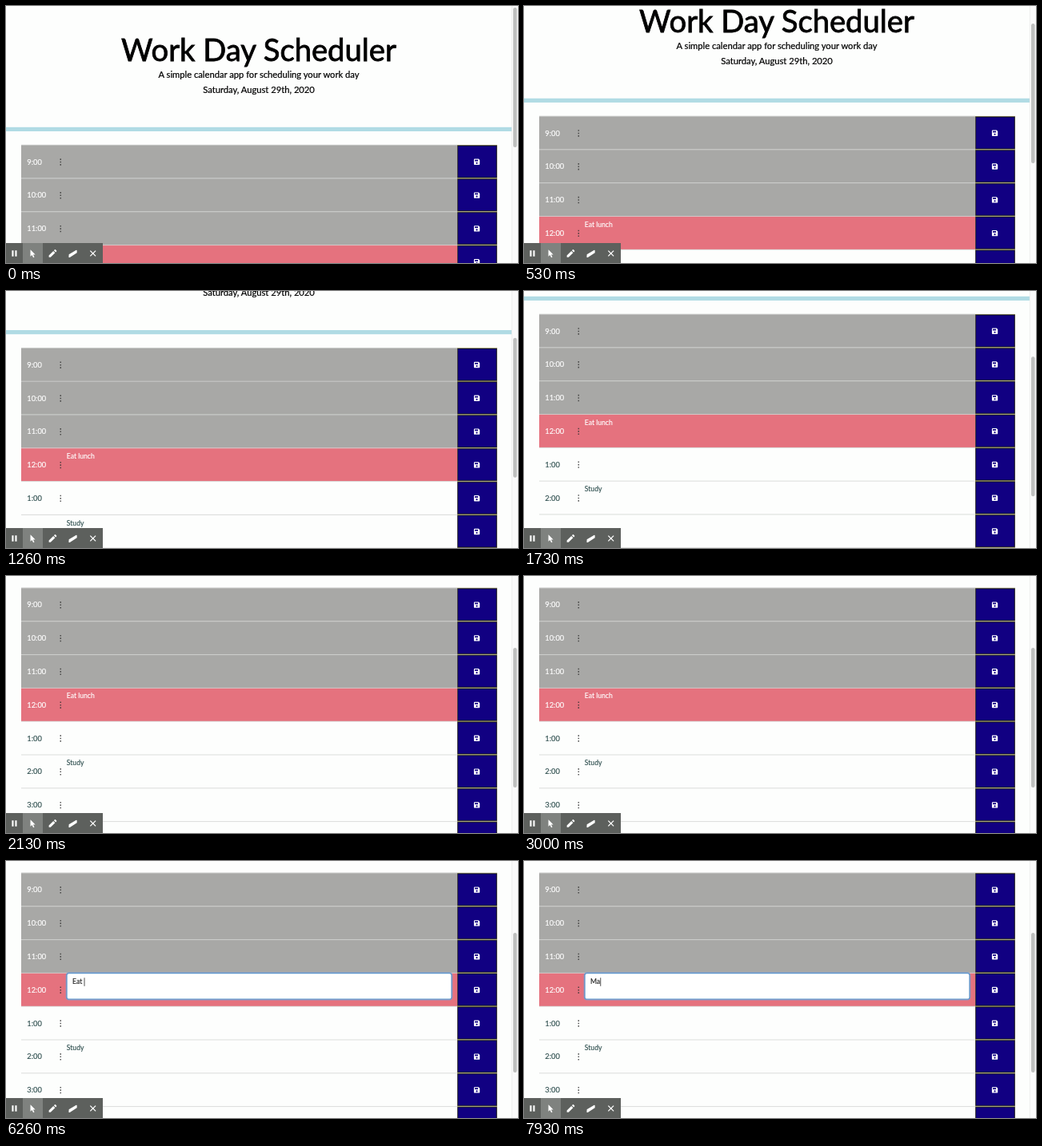
Write an HTML page that moves like this. It is 640 by 322 pixels and loops after 8 s.

```html
<!DOCTYPE html>
<html lang="en">
<head>
<meta charset="utf-8">
<title>Work Day Scheduler</title>
<style>
  html, body { margin: 0; height: 100%; overflow: hidden; background: #fdfefd; }
  svg { display: block; width: 100vw; height: 100vh; }
  text {
    font: 8.6px Lato, "Open Sans", sans-serif;
    fill: currentColor; stroke: currentColor; stroke-width: .15px;
    white-space: pre;
  }
  .heading text { text-anchor: middle; font-size: 11.2px; stroke-width: .22px; }
  .heading .title { font-size: 38.2px; stroke-width: .8px; }
  .time { font-size: 9.3px; }
  .past { --fill: #a8a8a6; color: #fff; }
  .present { --fill: #e5727e; color: #fff; }
  .future { --fill: #fdfefd; color: #2f4f4f; }
</style>
</head>
<body>
<svg viewBox="0 0 640 322">
  <defs>
    <g id="save">
      <rect width="50" height="41.8" fill="#8c8a50"/>
      <rect x=".4" y=".8" width="49.2" height="40.3" fill="#0c0838"/>
      <rect x="1.2" y="1.7" width="47.4" height="38.5" fill="#110082"/>
      <path d="M21.8 17.6h4.9l1.5 1.5v5a.9.9 0 0 1-.9.9h-5.5a.9.9 0 0 1-.9-.9v-5.6a.9.9 0 0 1 .9-.9z" fill="#fff"/>
      <path d="M22 18.7h4v1.8h-4z" fill="#110082"/>
      <circle cx="24.5" cy="22.8" r="1.1" fill="#110082"/>
    </g>
  </defs>

  <rect width="640" height="322" fill="#fdfefd"/>
  <g id="page">
    <g class="heading">
      <text class="title" x="316" y="69.5">Work Day Scheduler</text>
      <text x="316" y="90">A simple calendar app for scheduling your work day</text>
      <text x="316" y="108.6">Saturday, August 29th, 2020</text>
    </g>
    <rect y="151.8" width="632" height="5.2" fill="#b0dbe4"/>
    <g id="rows"></g>
    <g id="editor">
      <rect x="76" y="299.8" width="481" height="32.6" rx="3" fill="none" stroke="#7d9fd6" stroke-opacity=".55" stroke-width="3"/>
      <rect x="76" y="299.8" width="481" height="32.6" rx="2.5" fill="#fff" stroke="#5f97cc" stroke-width="1.3"/>
      <text id="entry" x="83" y="313.6" color="#222"></text>
      <path id="caret" d="M.6 305.5v10.5" stroke="#222" stroke-width=".8"/>
    </g>
  </g>

  <path id="pointer" d="M126.5 148.8q1.7 0 1.7 1q0-1 1.7-1M128.2 149.8v5M126.5 155.6q1.7 0 1.7-1q0 1 1.7 1" fill="none" stroke="#444" stroke-width=".8"/>

  <rect x="632" width="8" height="322" fill="#fafafa"/>
  <path d="M632.3 0v322" stroke="#e6e6e6" stroke-width=".6"/>
  <rect id="thumb" x="634" y="2" width="4.6" height="175" rx="2.3" fill="#bebfbe"/>

  <g fill="#fff">
    <rect y="297" width="121" height="25" fill="#5d605d"/>
    <rect x="21" y="297" width="25" height="25" fill="#7f827f"/>
    <path d="M7.4 306.2h2.1v7.6h-2.1zM11.4 306.2h2.1v7.6h-2.1z"/>
    <path d="M30.5 305.2v8.5l2-1.8 1.6 3.4 1.4-.7-1.6-3.2h2.7z"/>
    <path d="M53.6 314.8v-2.2l5.6-5.6 2.2 2.2-5.6 5.6zM59.9 306.3l1-1q.5-.4 1 0l1.200 1.200q.4.5 0 1l-1 1z"/>
    <path d="M78.600 311.200l8.800-5.200q1.200-.5 1.200.6v2.600l-8.800 5.700q-1.400.6-1.400-.5z"/>
    <path d="M105.300 306.600l6.800 6.800m0-6.800l-6.800 6.800" stroke="#fff" stroke-width="1.300"/>
  </g>
</svg>

<script>
const LOOP = 8000, ROW_TOP = 174, ROW_HEIGHT = 41.8;
const FOCUS = 3030, BLINK = 500, TYPING = 5100;
const notes = { "12:00": "Eat lunch", "2:00": "Study" };
const scrollKeys = [[0, 0], [60, .5], [200, 7], [800, 59.7], [1260, 102.7],
  [1730, 145], [1930, 157], [2060, 159.2]];
const edits = [[0, "Eat lunch"], [5100, "Eat lunc"], [5380, "Eat lun"], [5650, "Eat lu"],
  [5930, "Eat l"], [6200, "Eat "], [6450, "Eat"], [6680, "Ea"], [6920, "E"],
  [7150, ""], [7500, "M"], [7850, "Ma"]];

const byId = id => document.getElementById(id);
const [page, editor, entry, caret, pointer, thumb] =
  ["page", "editor", "entry", "caret", "pointer", "thumb"].map(byId);

function row(hour, i) {
  const time = `${hour}:00`;
  const state = i < 3 ? "past" : i === 3 ? "present" : "future";
  const note = notes[time] || "";
  return `<g class="${state}" transform="translate(0 ${ROW_TOP + i * ROW_HEIGHT})">
    <rect x="19" width="545" height="${ROW_HEIGHT}" fill="var(--fill)"/>
    <path d="M19 .2H564" stroke="#d2d3d2" stroke-width=".8"/>
    <text class="time" x="26.3" y="24.700">${time}</text>
    <path d="M68.200 17.300v8.400" stroke="#333" stroke-width="1.200" stroke-dasharray="1.600 1.800"/>
    <text ${state === "present" ? 'id="saved"' : ""} x="75.800" y="13.300">${note}</text>
    <use href="#save" x="564"/>
  </g>`;
}
byId("rows").innerHTML = [9, 10, 11, 12, 1, 2, 3, 4, 5].map(row).join("");
const saved = byId("saved");

function scrollAt(t) {
  const next = scrollKeys.findIndex(([time]) => time > t);
  if (next < 0) return scrollKeys.at(-1)[1];
  const [t0, y0] = scrollKeys[next - 1], [t1, y1] = scrollKeys[next];
  return y0 + (y1 - y0) * (t - t0) / (t1 - t0);
}

const show = (el, visible) => el.setAttribute("visibility", visible ? "inherit" : "hidden");

function draw(t) {
  const y = scrollAt(t), editing = t >= FOCUS;
  page.setAttribute("transform", `translate(0 ${-y})`);
  thumb.setAttribute("y", 2 + y * .553);

  show(editor, editing);
  show(saved, !editing);
  show(pointer, editing && t < TYPING);
  entry.textContent = edits.findLast(([time]) => time <= t)[1];
  caret.setAttribute("transform", `translate(${83 + entry.getComputedTextLength()} 0)`);
  show(caret, t >= TYPING || Math.floor((t - FOCUS) / BLINK) % 2 === 0);
}

const start = performance.now();
function tick() {
  draw((performance.now() - start) % LOOP);
  requestAnimationFrame(tick);
}
tick();
</script>
</body>
</html>
```
